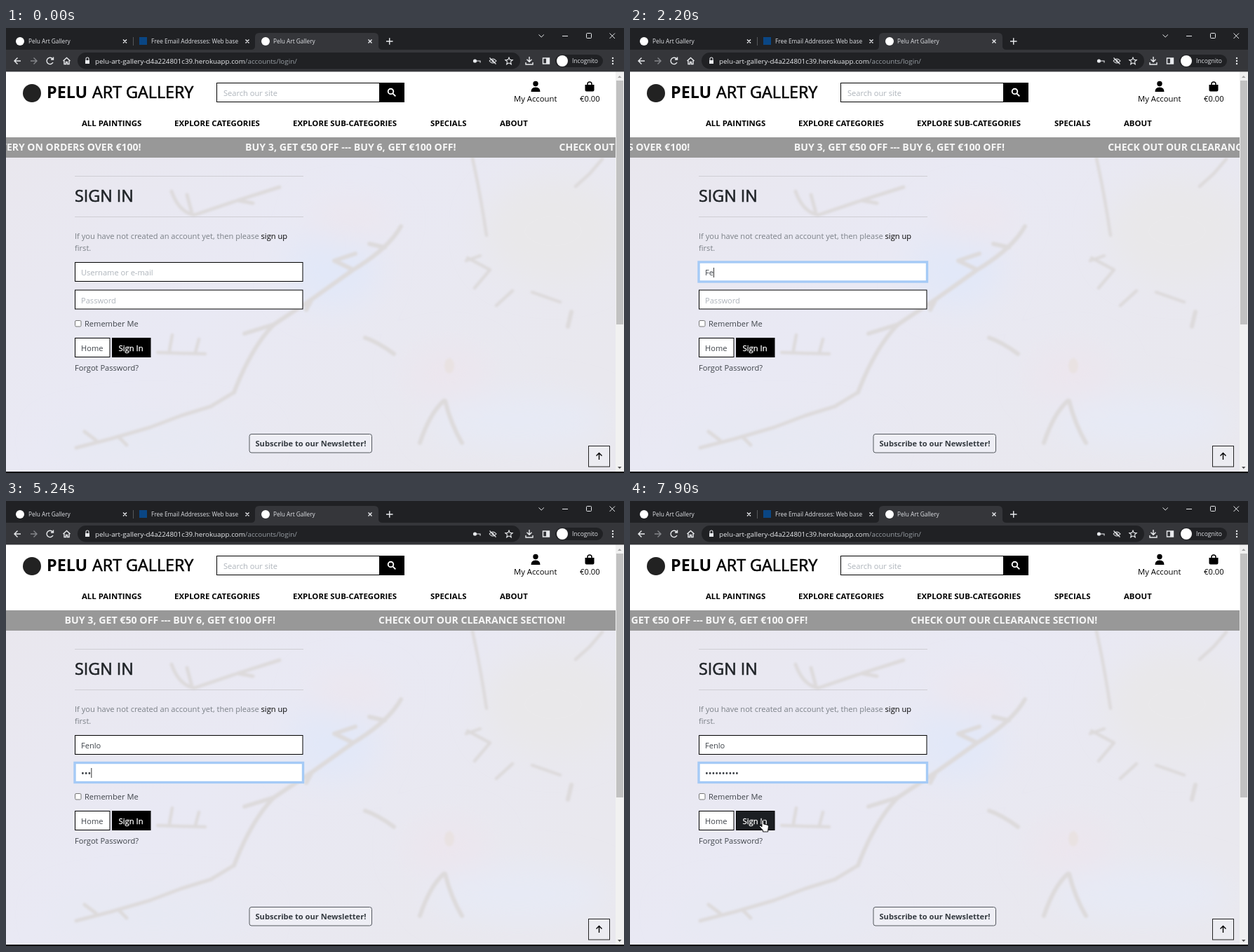
Recreate the animation shown at these times as an HTML page. Size 881 px wide and 635 px high, loop 7.99 s.

```html
<!DOCTYPE html>
<html lang="en">
<head>
<meta charset="utf-8">
<title>Sign in</title>
<style>
html, body { margin: 0; width: 100%; height: 100%; overflow: hidden; background: #fff; }
svg { display: block; width: 881px; height: 635px; font: 11.1px "Open Sans", "Noto Sans", sans-serif; }
text { white-space: pre; }
.line { fill: none; stroke: #e8eaed; stroke-width: 1.4; }
.tab { font-size: 8.3px; fill: #dfe1e5; }
.nav { font-size: 11.4px; font-weight: 700; }
.hint { fill: #aeb4bb; }
.body { fill: #3f444a; }
.box { fill: #fff; stroke: #000; }
.ring { fill: none; stroke: #a5caf6; stroke-width: 3.4; }
.medium { stroke: currentColor; stroke-width: .026em; fill: currentColor; }
.offer { font-size: 14px; font-weight: 700; fill: #f6f6f6; }
.branch { fill: none; stroke: #dddadb; stroke-width: 6; stroke-linecap: round; stroke-linejoin: round; filter: url(#soft); }
</style>
</head>
<body>
<svg viewBox="0 0 881 635">
  <defs>
    <linearGradient id="paper" x2="1" y2=".6">
      <stop offset="0" stop-color="#e9e7ee"/>
      <stop offset=".45" stop-color="#e9e9f4"/>
      <stop offset="1" stop-color="#e9e8ee"/>
    </linearGradient>
    <filter id="soft"><feGaussianBlur stdDeviation="1.4"/></filter>
    <filter id="haze" x="-50%" y="-50%" width="200%" height="200%"><feGaussianBlur stdDeviation="22"/></filter>
    <clipPath id="page"><path d="M0 185H869V633H0z"/></clipPath>
  </defs>

  <!-- painted backdrop -->
  <g clip-path="url(#page)">
    <path fill="url(#paper)" d="M0 185H869V633H0z"/>
    <g filter="url(#haze)">
      <ellipse cx="465" cy="345" rx="65" ry="55" fill="#e2e8f8"/>
      <ellipse cx="490" cy="275" rx="60" ry="30" fill="#ece7ef"/>
      <ellipse cx="780" cy="290" rx="100" ry="75" fill="#e9e8ea"/>
      <ellipse cx="630" cy="495" rx="60" ry="40" fill="#ece6ee"/>
      <ellipse cx="730" cy="560" rx="130" ry="40" fill="#e7eaf5"/>
      <ellipse cx="210" cy="590" rx="150" ry="35" fill="#e7e9f3"/>
    </g>
    <g class="branch">
      <path d="M325 520Q350 455 382 423L436 387 495 345Q545 315 563 283M382 423L340 436M436 387L428 402M540 313L518 308M495 345L468 332 498 322"/>
      <path stroke-width="5" d="M100 599L150 586 205 570 250 553 292 540 325 520M128 588L112 576M160 583L172 595M236 233Q246 262 268 267L330 246 390 227M265 264L258 238M330 246L352 250"/>
      <path stroke-width="4.500" d="M665 186Q676 235 685 296M658 328L690 345 668 371M656 332L676 325M699 396L722 375M750 377L790 391M812 226L832 208 850 187M216 463L245 464 284 465M233 460L237 438M270 463L275 444"/>
      <path d="M512 442Q530 448 553 465M624 532Q604 550 590 592M626 532Q634 565 650 592M801 426L806 405"/>
    </g>
    <ellipse cx="632" cy="482" rx="7" ry="11" fill="#e9e2e2" filter="url(#soft)"/>
  </g>

  <!-- browser frame -->
  <path fill="#202124" d="M0 0H881V62.500H0z"/>
  <path fill="#35363a" d="M0 31H349Q355 31 355 26V13Q355 7 361 7H525Q531 7 531 13V26Q531 31 537 31H881V62.500H0z"/>
  <rect x="102" y="35" width="631" height="23.500" rx="11.700" fill="#202124"/>
  <rect x="783" y="38" width="68" height="18" rx="9" fill="#202124"/>
  <g fill="#fff">
    <circle cx="20" cy="19" r="6"/><circle cx="370" cy="19" r="6"/><circle cx="793" cy="47" r="8"/>
  </g>
  <path fill="#0a4684" d="M190 13h11v11h-11z"/>
  <path stroke="#55575b" d="M181.500 13v12"/>
  <g class="tab">
    <text x="32" y="22">Pelu Art Gallery</text>
    <text x="207" y="22">Free Email Addresses: Web base</text>
    <text x="381" y="22">Pelu Art Gallery</text>
    <text x="807" y="50" font-size="8.500">Incognito</text>
  </g>
  <text x="127" y="50.500" font-size="9.800" fill="#e8eaed">pelu-art-gallery-d4a224801c39.herokuapp.com<tspan fill="#9aa0a6">/accounts/login/</tspan></text>
  <g class="line">
    <path d="M167 16.500l5 5m0-5l-5 5M341.500 16.500l5 5m0-5l-5 5M516.500 16.500l5 5m0-5l-5 5M542 19h9.500m-4.750-4.750v9.500"/>
    <path stroke-width="1" d="M759.500 9.500l3.700 3.500 3.700-3.500M793 11.500h8M827.500 8.500q0-1 1-1h5q1 0 1 1v5q0 1-1 1h-5q-1 0-1-1zM860.500 7.500l7.500 7.500m0-7.500l-7.500 7.500"/>
    <path d="M21 47H12m4.500-4.500L12 47l4.500 4.500M66.500 44A4.700 4.700 0 1 0 67 49M67.500 41.500v3.500H64M81.500 47l5-4.500 5 4.500M83 46.500v5h2.500v-3h2v3H90v-5"/>
    <path stroke="#85878b" d="M35 47h9m-4.500-4.500L44 47l-4.500 4.500"/>
    <path d="M114 46v-2a2 2 0 0 1 4 0v2M671 47h5v2.500M689 47q5-6 10 0q-5 6-10 0M689.500 42.500l9 9M717 42l1.500 3.400 3.700.3-2.800 2.400.9 3.700-3.300-2-3.300 2 .9-3.700-2.800-2.400 3.700-.3z" stroke-width="1.100"/>
    <path d="M746 41v7m-3.500-3.300L746 48.300l3.500-3.600M741 49v3h10v-3M765.500 43h9v8h-9z"/>
  </g>
  <g fill="#e8eaed">
    <path d="M113 46h6v5h-6zM770 43h5v8h-5z"/>
    <circle cx="668.500" cy="47" r="2.600"/><circle cx="694" cy="47" r="1.600"/>
    <circle cx="865" cy="43" r="1.200"/><circle cx="865" cy="47" r="1.200"/><circle cx="865" cy="51" r="1.200"/>
  </g>

  <!-- site header -->
  <path fill="#fff" d="M0 62.500H869V156H0z"/>
  <circle cx="37" cy="93" r="13" fill="#222"/>
  <g font-size="23.300">
    <text x="58" y="99.500" font-weight="700">PELU</text>
    <text class="medium" x="123" y="99.500">ART GALLERY</text>
  </g>
  <rect class="box" x="300.500" y="78.500" width="232" height="27"/>
  <path d="M532 78H568V106H532z"/>
  <text class="hint" x="310" y="97">Search our site</text>
  <g fill="none" stroke="#fff" stroke-width="1.900"><circle cx="548.500" cy="90.500" r="3.800"/><path d="M551.300 93.300l4 4"/></g>
  <circle cx="755" cy="79.500" r="3.700"/>
  <path d="M748.500 91q0-6.500 6.500-6.500t6.500 6.500zM825.500 81h13v7.500q0 2-2 2h-9q-2 0-2-2z"/>
  <path fill="none" stroke="#000" stroke-width="1.500" d="M829 82v-2a3 3 0 0 1 6 0v2"/>
  <text x="724" y="105" font-size="11.300">My Account</text>
  <text x="818" y="105">€0.00</text>
  <g class="nav">
    <text x="108" y="140">ALL PAINTINGS</text>
    <text x="240" y="140">EXPLORE CATEGORIES</text>
    <text x="409" y="140">EXPLORE SUB-CATEGORIES</text>
    <text x="605" y="140">SPECIALS</text>
    <text x="704" y="140">ABOUT</text>
  </g>

  <!-- offers ticker -->
  <path fill="#989898" d="M0 156H869V185H0z"/>
  <g class="offer" id="ticker">
    <text x="192.500" y="175" text-anchor="end">FREE DELIVERY ON ORDERS OVER €100!</text>
    <text x="341" y="175" style="font-size:14.200px">BUY 3, GET €50 OFF --- BUY 6, GET €100 OFF!</text>
    <text x="788.500" y="175">CHECK OUT OUR CLEARANCE SECTION!</text>
  </g>

  <!-- form -->
  <path stroke="#cfced4" d="M98 211.500H424M98 269.500H424"/>
  <text class="medium" x="98" y="247.500" font-size="23.300" color="#212529">SIGN IN</text>
  <text x="98" y="301" fill="#7b8087">If you have not created an account yet, then please <tspan fill="#000">sign up</tspan></text>
  <text x="98" y="318" fill="#7b8087">first.</text>
  <g id="user">
    <rect class="box" x="98.500" y="334.500" width="324.500" height="27"/>
    <rect class="ring" x="98" y="334" width="325.500" height="28"/>
    <text class="hint" x="107" y="353">Username or e-mail</text>
    <text class="body" x="107" y="353"></text>
  </g>
  <g id="pass">
    <rect class="box" x="98.500" y="374" width="324.500" height="27"/>
    <rect class="ring" x="98" y="373.500" width="325.500" height="28"/>
    <text class="hint" x="107" y="392.500">Password</text>
    <text class="body" x="107" y="393.200" font-size="12.700"></text>
  </g>
  <path id="caret" stroke="#333" d="M.500 0v14"/>
  <rect x="98.500" y="417.500" width="8.500" height="8.500" rx="1.500" fill="#fff" stroke="#767676"/>
  <text class="body" x="112" y="426">Remember Me</text>
  <rect class="box" x="98.500" y="442.500" width="49.500" height="27"/>
  <rect id="submit" x="151.500" y="442.500" width="54.500" height="27" stroke="#000"/>
  <text class="body" x="107" y="460.500">Home</text>
  <text class="medium" x="160.500" y="460.500" font-size="11.300" color="#fff">Sign In</text>
  <text class="body" x="98" y="489">Forgot Password?</text>
  <rect x="347" y="579.500" width="174.500" height="26.500" rx="3" fill="#eeeef5" stroke="#54585e"/>
  <text x="355.500" y="597" font-weight="700" fill="#343a40">Subscribe to our Newsletter!</text>
  <rect x="830.500" y="596.500" width="30" height="29.500" fill="#ececf1" stroke="#222"/>
  <path fill="none" stroke="#000" stroke-width="1.400" d="M845.500 616v-9.500m-4 4l4-4 4 4"/>

  <!-- scrollbar and window edge -->
  <path fill="#f1f1f1" d="M869 62.500H881V633H869z"/>
  <path fill="#c1c1c1" d="M870 75H880V423H870z"/>
  <path fill="#a3a3a3" d="M872 71h5.500l-2.750-3z"/>
  <path fill="#505050" d="M872 626h5.500l-2.750 3z"/>
  <path fill="#111" d="M0 633H881V635H0z"/>
  <path id="hand" fill="#fff" stroke="#000" stroke-width=".9" stroke-linejoin="round" d="M0 1q1.500-1.500 2.600 0v5l5.400 1.200q1.600.5 1.500 2.300l-.8 5.500v2H1.500v-2l-5-5.500q0-1.700 1.700-1.200L0 10z"/>
</svg>
<script>
const LOOP = 7990, STEP = 77.9, SPEED = 49.4, TICKER_START = 40;
const USER = "Fenlo", USER_START = 1900, USER_GAP = 230;
const PASS_LENGTH = 10, PASS_START = 4780, PASS_GAP = 220;
const USER_FOCUS = 1100, USER_BLUR = 4340, PASS_FOCUS = 4390, CARET_END = 7540, HOVER = 7500;
const el = id => document.getElementById(id);
const clamp = v => Math.max(0, Math.min(1, v));
const ease = v => v * v * (3 - 2 * v);
const keysPressed = (t, start, gap, count) =>
  Math.max(0, Math.min(count, Math.floor((t - start) / gap) + 1));

function screenTime(t) {
  if (t < 110) return 0;
  if (t >= 6710 && t < 7040) t = 6710;
  return 110 + STEP * Math.floor((t - 75) / 78);
}

function drawField(id, value, focus) {
  const [box, ring, hint, text] = el(id).children;
  box.style.stroke = focus > .3 ? "#86b7ee" : "#000";
  ring.style.opacity = focus;
  hint.style.display = value ? "none" : "";
  text.textContent = value;
  return value ? text.getComputedTextLength() : 0;
}

function draw(t) {
  const shift = SPEED * Math.max(0, t - TICKER_START) / 1000;
  el("ticker").setAttribute("transform", `translate(${-shift})`);

  const letters = keysPressed(t, USER_START, USER_GAP, USER.length);
  const dots = keysPressed(t, PASS_START, PASS_GAP, PASS_LENGTH);
  const fade = start => ease(clamp((t - start) / 150));
  const userWidth = drawField("user", USER.slice(0, letters), fade(USER_FOCUS) * (1 - fade(USER_BLUR)));
  const passWidth = drawField("pass", "•".repeat(dots), fade(PASS_FOCUS));

  // The caret blinks from the latest focus or key press.
  const inPass = t >= PASS_FOCUS;
  const lastKey = inPass
    ? (dots ? PASS_START + PASS_GAP * (dots - 1) : PASS_FOCUS)
    : (letters ? USER_START + USER_GAP * (letters - 1) : USER_FOCUS);
  const caretOn = t >= USER_FOCUS && t < CARET_END && Math.floor((t - lastKey) / 500) % 2 === 0;
  el("caret").style.display = caretOn ? "" : "none";
  el("caret").setAttribute("transform",
    `translate(${107 + (inPass ? passWidth : userWidth)} ${inPass ? 381 : 342})`);

  const move = ease(clamp((t - HOVER) / 300));
  const over = t >= HOVER;
  el("hand").style.display = over ? "" : "none";
  el("hand").setAttribute("transform", `translate(${198 - 10 * move} ${444 + 11 * move})`);
  el("submit").style.fill = over ? "#1c1f23" : "#000";
}

function tick() {
  draw(screenTime(performance.now() % LOOP));
  requestAnimationFrame(tick);
}
tick();
</script>
</body>
</html>
```
